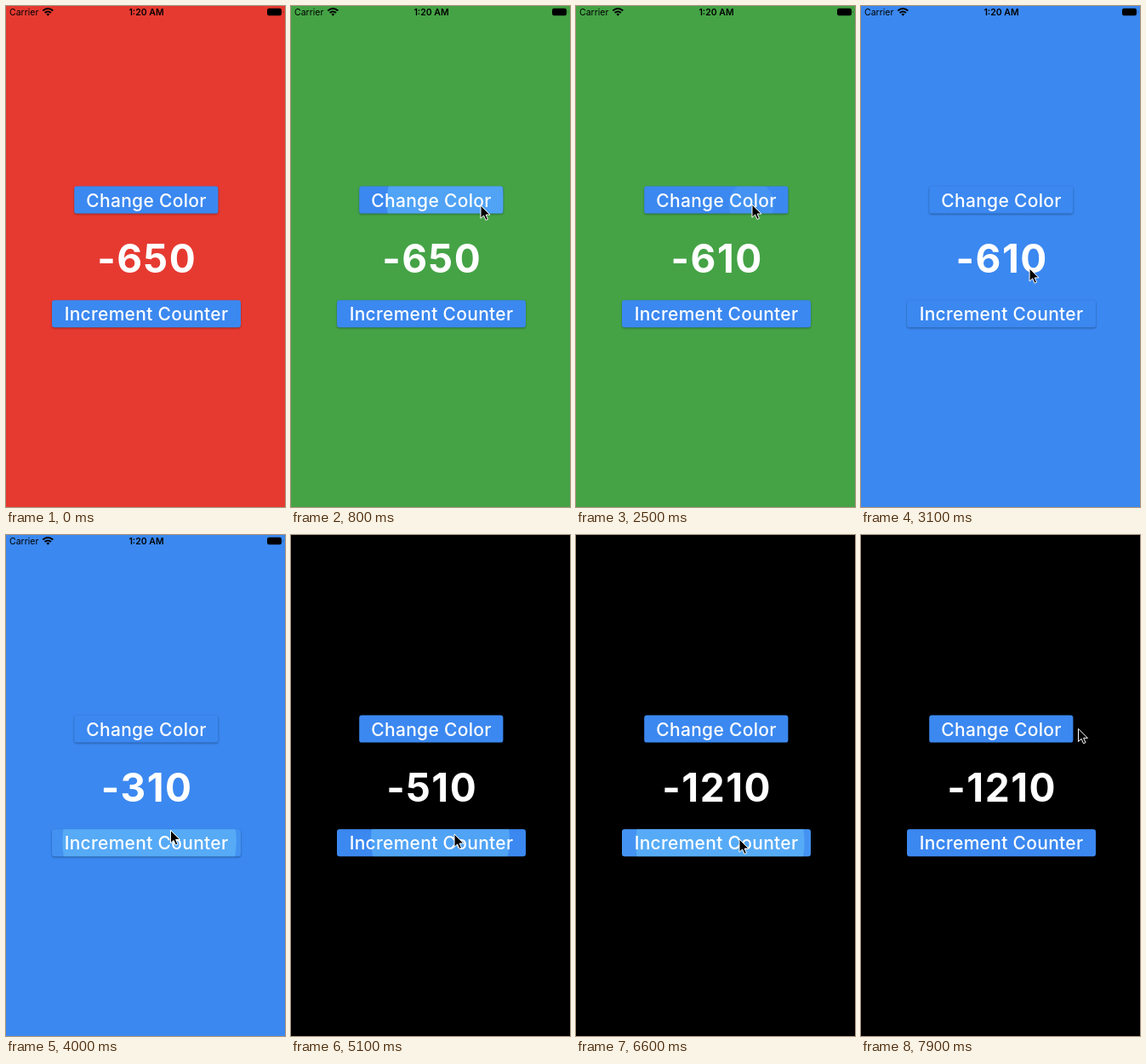
An HTML page for the animation above (8 s loop, 328x588 px).

```html
<!DOCTYPE html>
<html lang="en">
<head>
<meta charset="utf-8">
<title>Counter</title>
<style>
html, body { margin: 0; height: 100%; overflow: hidden; }
svg { display: block; width: 328px; height: 588px; font-family: Inter, Roboto, sans-serif; }
.button { fill: #3b88f0; filter: drop-shadow(0 1px 1.2px rgba(0, 0, 0, .35)); }
.ripples { fill: #80e0ff; }
.label { fill: #fff; font-size: 21px; font-weight: 500; letter-spacing: .3px; text-anchor: middle; }
#count {
  fill: #fff; font-size: 46px; font-weight: 700; letter-spacing: 1.5px;
  font-feature-settings: "calt" 0; text-anchor: middle;
}
.status { font-size: 10.5px; }
</style>
</head>
<body>
<svg viewBox="0 0 328 588">
  <defs>
    <clipPath id="colorClip"><rect x="80.2" y="211.6" width="169.2" height="32" rx="3.2"/></clipPath>
    <clipPath id="countClip"><rect x="54" y="345.2" width="222" height="32" rx="3.2"/></clipPath>
  </defs>
  <rect id="page" width="328" height="588"/>

  <g class="status">
    <text x="4" y="10.7">Carrier</text>
    <text x="165" y="10.7" font-weight="600" text-anchor="middle">1:20 AM</text>
    <path d="M43.3 5.6Q49.3 .4 55.3 5.6M45.6 8.1Q49.3 4.9 53 8.1" fill="none" stroke="#000" stroke-width="2"/>
    <path d="M47.3 9.6Q49.3 7.9 51.3 9.6L49.3 11.7Z"/>
    <rect x="307" y="2.8" width="17" height="8.4" rx="2.2"/>
    <path d="M325 5.5Q326.6 7 325 8.5Z" fill-opacity=".5"/>
  </g>

  <rect class="button" x="80.2" y="211.6" width="169.2" height="32" rx="3.2"/>
  <g class="ripples" id="colorRipples" clip-path="url(#colorClip)"></g>
  <text class="label" x="165" y="235.5">Change Color</text>

  <text id="count" x="165.7" y="312.5"></text>

  <rect class="button" x="54" y="345.2" width="222" height="32" rx="3.2"/>
  <g class="ripples" id="countRipples" clip-path="url(#countClip)"></g>
  <text class="label" x="165" y="369">Increment Counter</text>

  <path id="cursor" d="M0 0V15.2L3.6 11.9 6 17.4 8.5 16.3 6.1 11H11Z" stroke="#fff" stroke-linejoin="round"/>
</svg>
<script>
const LOOP = 8000, START_COUNT = -650, CENTRE = 165;
const HOLD = 70, GAP = 205, SETTLE = 20, LINGER = 120;   // click rhythm in ms
const $ = id => document.getElementById(id);
const clamp = v => Math.min(1, Math.max(0, v));
const mix = (a, b, k) => a + (b - a) * k;

// Each page colour has its own counter step
const modes = [
  { color: '#e63a31', step: -10 },
  { color: '#45a346', step: 10 },
  { color: '#3b88f0', step: 100 },
  { color: '#000', step: -100 }
];
const color = { layer: $('colorRipples'), y: 227.6, radius: 86 };
const count = { layer: $('countRipples'), y: 361.2, radius: 112 };

// The pointer rests at a place while it clicks, or only passes through
const pass = (x, y, at) => ({ x, y, arrive: at, leave: at, clicks: [] });
function press(button, x, y, first, times = 1) {
  const clicks = Array.from({ length: times }, (_, i) => ({ button, x, y, up: first + i * GAP }));
  return { x, y, clicks, arrive: first - HOLD - SETTLE, leave: clicks[times - 1].up + LINGER };
}
const visits = [
  pass(330, 262, 150),
  press(color, 223, 234, 721),
  press(count, 195, 352, 1400, 4),
  press(color, 207, 233, 2540),
  press(count, 193.5, 346.5, 3475, 3),
  press(color, 206, 234, 4330),
  press(count, 192, 350, 4690),
  press(count, 192, 351, 5037, 4),
  press(count, 192, 357, 5881, 4),
  pass(188, 270, 7200),
  pass(312, 243, 7550),
  pass(255.5, 227.3, 7880)
];
const clicks = visits.flatMap(v => v.clicks);

function pointer(t) {
  const i = Math.max(0, visits.findLastIndex(v => v.arrive <= t));
  const a = visits[i], b = visits[i + 1] || a;
  const p = clamp((t - a.leave) / (b.arrive - a.leave || 1)), k = p * p * (3 - 2 * p);
  return [mix(a.x, b.x, k), mix(a.y, b.y, k)];
}

// cubic-bezier(.25, .1, .25, 1)
function ease(x) {
  let lo = 0, hi = 1, s;
  for (let i = 0; i < 20; i++) {
    s = (lo + hi) / 2;
    if (.75 * s * (1 - s) + s ** 3 < x) lo = s; else hi = s;
  }
  return .3 * s * (1 - s) ** 2 + 3 * s * s * (1 - s) + s ** 3;
}

for (const click of clicks) {
  click.node = document.createElementNS('http://www.w3.org/2000/svg', 'circle');
  click.button.layer.append(click.node);
}

// Grows slowly while held, quickly after release, and drifts to the button's centre
function drawRipple({ node, button, x, y, up }, t) {
  const held = t - up + HOLD, freed = t - up;
  const grow = ease(clamp(Math.min(held, HOLD) / 1000 + Math.max(freed, 0) / 225));
  node.setAttribute('cx', mix(x, CENTRE, grow));
  node.setAttribute('cy', mix(y, button.y, grow));
  node.setAttribute('r', button.radius * mix(.3, 1, grow));
  node.setAttribute('opacity', .3 * clamp(held / 75) * clamp((375 - freed) / 150));
}

function draw(t) {
  let mode = 0, total = START_COUNT;
  for (const { button, up } of clicks) {
    if (up > t) break;
    if (button === color) mode++;
    else total += modes[mode].step;
  }
  $('page').setAttribute('fill', modes[mode].color);
  $('count').textContent = total;
  clicks.forEach(click => drawRipple(click, t));
  $('cursor').setAttribute('transform', `translate(${pointer(t)})`);
}

const start = performance.now();
function tick() {
  draw((performance.now() - start) % LOOP);
  requestAnimationFrame(tick);
}
tick();
</script>
</body>
</html>
```
